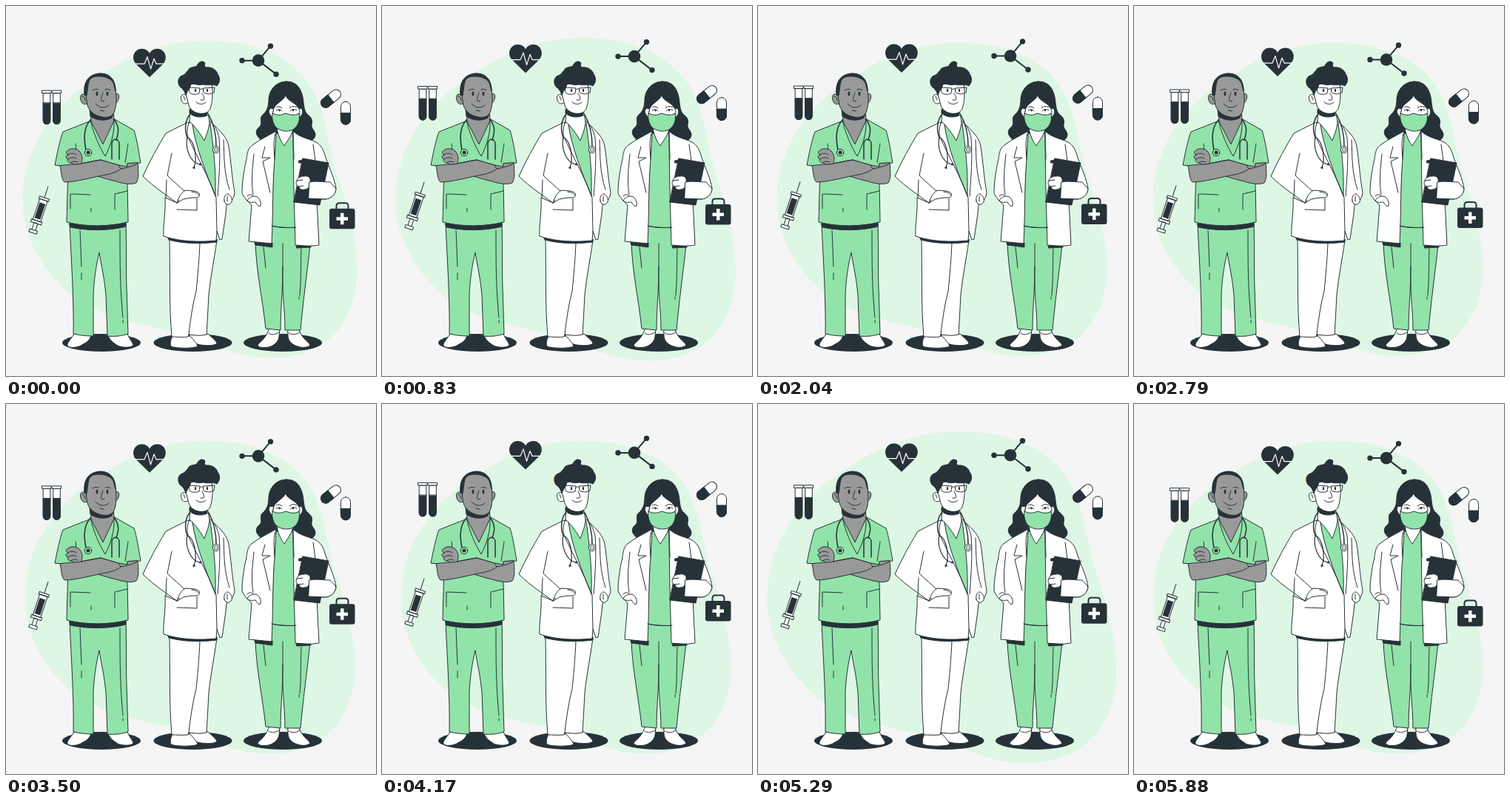
Recreate the animation shown at these times as an HTML page. Size 500 by 500 pixels, loop 5.93 s.

```html
<!DOCTYPE html>
<html lang="en">
<head>
<meta charset="utf-8">
<title>Medical team</title>
<style>
  html, body { margin: 0; width: 100%; height: 100%; overflow: hidden; background: #f5f5f5; }
  svg { display: block; width: 100%; height: 100%; }
  .l { fill: none; }
  .w { fill: #fff; }
  .g { fill: #92e3a9; }
  .s { fill: #999; }
  .d { fill: #263238; }
  .n { stroke: none; }
  .line { stroke: #263238; stroke-width: 1; stroke-linecap: round; stroke-linejoin: round; }
  .tube { fill: none; stroke-width: 1.5; }
</style>
</head>
<body>
<svg viewBox="0 0 500 500">
  <path id="blob" fill="#def7e5" d="M25.5 262C25.5 197 61 146 105 112C150 78 205 50 270 49.5C345 50 399 78 420 131C432 162 434 195 443 222C455 260 471 303 471 356C471 430 425 473 355 473C300 472 270 447 205 433C150 420 107 410 73 373C40 338 25.5 300 25.5 262Z"/>

  <g class="d">
    <ellipse cx="129" cy="455" rx="53" ry="12"/>
    <ellipse cx="252.500" cy="455" rx="53" ry="12"/>
    <ellipse cx="374" cy="455" rx="53" ry="12"/>
  </g>

  <!-- nurse in scrubs -->
  <g class="line">
    <path class="w" d="M92 443L115 444C114 451 109 455 104 457C98 462 85 463 83 459C82 455 89 449 92 443Z"/>
    <path class="w" d="M138 444L164 443C166 449 171 454 172 458C171 462 157 462 151 459C145 455 139 451 138 444Z"/>
    <path class="g" d="M86 294L162 294C163 330 162 350 163 380L165 443C156 446 147 447 137 446L135 390C133 368 129 352 126 333C122 350 119 368 118 390L118 446C108 446 100 445 91 443C92 400 88 340 86 294Z"/>
    <path class="l" d="M100 303L102 352M102 361L102 370M154 303C154 350 154 380 158 421M158 425L158 428"/>
    <path class="d" d="M86 294C110 297 140 297 162 293L162 298C140 304 110 304 87 299Z"/>
    <path class="g" d="M115 155L77 170C73 180 69 200 66 215L84 217L82 292C110 299 140 298 165 292L164 238L164 213L182 212C179 195 177 180 173 168L145 152Z"/>
    <path class="l" d="M94 186L95 196M165 186L161 212M87 274L87 254L114 255M115 273L115 278M147 275L147 254L164 250"/>
    <path class="s" d="M114 136L115 156L131 187L146 155L145 138Z"/>
    <path class="d" d="M113 140L114 149C123 155 135 156 143 151L146 142Z"/>
    <path class="l" d="M114 154C118 172 126 190 134 203C142 188 147 171 146 153"/>
    <path class="s" d="M108 120C102 117 99 121 101 127C102 132 106 134 110 132Z"/>
    <path class="s" d="M147 120C152 116 154 121 152 126C151 130 149 132 146 131Z"/>
    <path class="s" d="M108 121C106 105 114 94 127 93C140 92 147 100 148 112C150 125 149 137 146 144C142 152 133 151 126 149C117 146 112 141 110 134Z"/>
    <path class="d" d="M106 120C104 102 112 92 127 91C141 91 148 100 148 115L145 104C140 94 120 93 114 98C110 104 111 113 109 121Z"/>
    <path class="l" d="M117 114C120 112 123 112 125 113M134 113C136 112 139 112 141 114M131 117C130 122 127 127 129 128C130 129 132 129 133 128M121 132C126 138 134 139 139 134M127 141L132 142M103 122C105 122 107 125 107 128"/>
    <ellipse class="d n" cx="123" cy="118.500" rx="1.400" ry="3"/>
    <ellipse class="d n" cx="137" cy="118.500" rx="1.400" ry="3"/>
    <path class="tube" d="M114 154C105 164 105 180 108 194M146 153C154 164 152 172 149 181M143 207L143 187C143 178 153 178 153 187L153 207"/>
    <circle class="g" cx="111" cy="198" r="4.800"/>
    <circle class="d n" cx="111" cy="198" r="2.500"/>
    <path class="s" d="M178 212C179 222 180 233 176 239C169 242 158 240 149 237C136 234 127 231 118 228L101 213C110 212 119 209 128 208L152 215L164 217L164 213Z"/>
    <path class="s" d="M73 216C75 225 75 235 79 238C95 238 118 231 140 227C147 225 152 223 155 220L152 215L128 208L101 213Z"/>
    <path class="l" d="M155 220C162 219 170 217 178 213"/>
    <path class="s" d="M128 208C119 209 111 211 102 213C104 206 103 200 99 196C95 192 87 192 84 195C80 197 81 200 84 201C80 202 80 206 84 207C82 209 84 212 88 212C91 215 97 214 102 213"/>
    <path class="l" d="M84 201C88 198 92 199 95 201M84 207C88 204 91 204 95 206M88 212C91 209 94 210 97 211"/>
  </g>

  <!-- doctor with glasses -->
  <g class="line">
    <path class="w" d="M248 443L273 443C278 448 284 452 285 456C281 460 265 459 259 457C252 455 247 450 248 443Z"/>
    <path class="w" d="M225 446L249 446C253 451 258 456 259 460C253 463 230 463 223 460C221 456 223 450 225 446Z"/>
    <path class="w" d="M221 316L285 316C281 345 277 363 274 390C273 410 272 427 271 444C263 446 255 445 247 444L246 447C239 448 231 447 224 447C220 400 222 360 221 316Z"/>
    <path class="l" d="M262 320C261 345 259 365 257 385C252 405 249 425 247 444"/>
    <path class="d" d="M219 312C240 318 265 319 285 315L285 319C262 322 238 321 220 316Z"/>
    <path class="w" d="M244 158L216 172C205 190 194 210 185 230C200 245 216 255 231 266L215 259C216 280 212 296 213 311C235 319 264 319 284 317L285 304L289 316L292 315C294 299 297 285 298 269C303 267 308 261 309 252C305 230 304 208 301 190C299 178 292 171 276 156Z"/>
    <path class="g" d="M252 160L276 158C280 190 284 220 283 257C270 225 256 190 252 160Z"/>
    <path class="w" d="M249 138L248 156C256 163 264 175 268 182C271 173 275 164 275 156L272 140Z"/>
    <path class="d" d="M248 140L248 145C255 151 265 151 272 148L272 143Z"/>
    <path class="l" d="M248 156C245 163 244 170 246 177C257 202 273 229 284 259L285 304M275 155C281 160 285 166 288 178C290 205 288 230 286 257M224 199L218 229C226 237 235 244 241 250M294 181C295 204 294 224 302 248M216 259L217 235"/>
    <path class="w" d="M231 266C233 259 237 251 243 249C250 250 257 249 261 253C263 257 260 259 256 259C250 259 244 260 240 261Z"/>
    <path class="l" d="M251 251C256 251 259 253 261 256M231 275L258 276L258 260M231 266L234 262"/>
    <path class="w" d="M295 264C294 258 296 254 300 254C304 256 306 260 305 265C302 269 297 270 295 264ZM299 257L299 264"/>
    <path class="tube" d="M248 147C242 155 241 168 245 178M274 147C281 160 284 174 284 189"/>
    <path class="l" style="stroke-width:1.200" d="M245 178C242 190 247 205 256 212M245 178C253 180 257 196 256 212M256 212L254 218M256 212L262 214"/>
    <circle class="d n" cx="254" cy="218.500" r="1.600"/>
    <circle class="d n" cx="262.500" cy="214" r="1.600"/>
    <circle class="w" cx="284" cy="194" r="4.700"/>
    <circle class="l" cx="284" cy="194" r="2.500"/>
    <path class="w" d="M244 121C239 117 235 121 237 127C238 132 242 133 246 131Z"/>
    <path class="w" d="M243 108C247 98 275 97 278 106C280 118 279 130 276 139C273 145 267 146 260 145C251 143 247 137 246 130L243 119Z"/>
    <path class="d" d="M243 120C241 116 240 112 236 110C231 105 232 96 238 94C242 93 243 90 246 87C248 82 254 83 258 81C260 75 266 73 269 77C268 80 268 82 271 83C278 82 285 87 286 92C290 97 289 104 285 108C280 105 273 108 266 106C259 108 254 104 250 106C249 109 248 112 246 114Z"/>
    <path class="l" d="M245 112L248 111M248 110L262 111L261 118C258 120 250 120 248 117ZM267 111L282 110L281 117C277 120 269 119 267 117ZM262 113C264 111 266 112 267 113M265 118C267 122 269 125 267 127L263 127M257 130C262 134 267 133 270 130M240 122L242 127"/>
    <ellipse class="d n" cx="256" cy="114" rx="1.200" ry="2.300"/>
    <ellipse class="d n" cx="272" cy="114" rx="1.200" ry="2.300"/>
  </g>

  <!-- doctor with mask -->
  <g class="line">
    <path class="w" d="M356 434L370 434L369 447C368 454 362 459 355 461C348 462 341 462 340 458C344 453 353 448 356 434Z"/>
    <path class="w" d="M381 434L395 434C398 448 408 453 411 458C409 462 399 462 394 460C387 458 381 453 381 445Z"/>
    <path class="l" d="M355 442C360 446 365 443 369 441M382 442C387 445 392 444 397 441"/>
    <path class="g" d="M337 320L359 297L392 299L411 322C407 360 401 402 398 438L377 438C377 410 373 390 374 352C374 386 371 410 371 438L351 436C347 398 338 357 337 320Z"/>
    <path class="l" d="M374 321L374 352M348 326L351 354M399 328C398 350 399 372 397 391M396 393L396 396"/>
    <path class="d" d="M336 318L360 320L360 326L337 323ZM392 320L412 322L412 326L393 327Z"/>
    <path class="d" d="M379 102C365 102 356 113 355 126C355 137 352 143 346 148C342 153 347 158 343 163C337 167 337 173 341 177C344 182 349 184 356 183L401 184C409 185 418 181 418 174C418 168 412 166 413 160C415 154 412 150 408 147C402 142 403 134 401 123C398 109 391 102 379 102Z"/>
    <path class="g" d="M364 172L390 172L394 300C383 299 371 300 359 297Z"/>
    <path class="w" d="M366 160L367 170C369 178 373 185 376 189C380 183 385 176 387 170L388 160Z"/>
    <path class="w" d="M365 169C355 175 342 181 333 188C328 191 326 197 325 207C321 224 319 239 319 253C322 260 328 265 332 269L328 318L359 321C361 281 360 240 363 207Z"/>
    <path class="w" d="M388 169C394 176 407 179 417 183C426 187 429 194 432 205C437 219 444 233 446 247C445 255 440 260 432 261L420 261L423 323C413 325 402 324 391 323L389 250Z"/>
    <path class="l" d="M365 169C361 179 362 193 363 207M388 169C388 185 389 195 389 207M350 190L346 205L357 205L347 210L357 252M335 200C333 219 331 237 334 255M415 187L418 209M359 297C370 300 384 300 392 299"/>
    <path class="w" d="M326 263C328 258 333 257 338 257C343 260 345 265 344 270C341 272 339 268 337 265C334 265 330 267 326 263Z"/>
    <path class="l" d="M334 257C332 254 329 254 326 257"/>
    <path class="d" d="M401 206L436 212L424 269L389 265Z"/>
    <path class="d" d="M396 209L403 208L404 212L396 212Z"/>
    <path class="w" d="M393 236C394 232 398 230 403 230C408 229 412 232 411 237C411 243 409 248 403 248C399 249 396 247 396 244C392 243 391 239 393 236Z"/>
    <path class="w" d="M410 238C419 236 429 238 438 238L446 247C445 255 440 260 432 261L409 260Z"/>
    <path class="l" d="M394 236L401 235M396 244L402 243"/>
    <path class="w" d="M361 139C355 136 354 143 357 147C359 151 361 151 363 150ZM396 139C401 136 402 144 399 148C397 151 395 151 394 150Z"/>
    <path class="w" d="M361 142C362 132 373 130 378 121C381 130 394 130 397 142C397 152 393 163 386 167C378 170 370 168 365 162C361 155 360 148 361 142Z"/>
    <path class="g" d="M360 145C368 149 373 147 378 145C384 147 390 149 396 145C398 155 394 163 388 167C380 171 370 169 364 163C360 157 359 150 360 145Z"/>
    <path class="l" d="M365 137C367 135 371 136 373 138M383 138C386 135 390 135 393 137M365 141C368 139 371 140 373 142M384 142C386 139 390 139 393 141"/>
    <circle class="d n" cx="369.500" cy="141" r="1.300"/>
    <circle class="d n" cx="388" cy="141" r="1.300"/>
  </g>

  <g id="icons" class="line">
    <path class="d n" d="M194 96L175.500 78C168 69 174 57.500 183.500 57.500C189 57.500 192.500 60.500 194 64C195.500 60.500 199 57.500 204.500 57.500C214 57.500 220 69 212.500 78Z"/>
    <path class="l" style="stroke:#fff;stroke-width:1.200" d="M173 78H187L191 68.500L195.500 85L200 71L203 78H215"/>

    <g id="tubes"></g>

    <g transform="translate(46.500 275) rotate(18.400)">
      <path class="l" d="M0 -33V-17"/>
      <path class="w" d="M-5.500 -14H5.500V16H-5.500ZM-7 -17H7V-13.500H-7ZM-2.500 19H2.500V29H-2.500ZM-7.500 15.500H7.500V19.500H-7.500ZM-5.500 29H5.500V33H-5.500Z"/>
      <path class="d n" d="M-4 -9H4V13H-4Z"/>
    </g>

    <path class="l" style="stroke-width:2" d="M357.500 54L341 73.500L319 73.500M341 73.500L365 92"/>
    <g class="d n">
      <circle cx="341" cy="73.500" r="8.300"/>
      <circle cx="357.500" cy="54" r="3.700"/>
      <circle cx="319" cy="73.500" r="3.700"/>
      <circle cx="365" cy="92" r="3.700"/>
    </g>

    <g id="pills"></g>

    <path class="l" style="stroke-width:2" d="M446.500 275V270Q446.500 266 450.500 266H458.500Q462.500 266 462.500 270V275"/>
    <rect class="d n" x="437" y="273.500" width="34.500" height="27.500" rx="3"/>
    <path class="n w" d="M452 279.500H456.500V285H462V289.500H456.500V295H452V289.500H446.500V285H452Z"/>
  </g>
</svg>
<script>
const byId = id => document.getElementById(id);
const LOOP = 5930, FPS = 24, LAST = 141, LEAD = 20;

byId('tubes').innerHTML = [55, 68.5].map(x => `
  <g transform="translate(${x} 114)">
    <path class="w" d="M-4.800 4V40Q-4.800 45.500 0 45.500Q4.800 45.500 4.800 40V4Z"/>
    <path class="d" d="M-4.800 17V40Q-4.800 45.500 0 45.500Q4.800 45.500 4.800 40V17Z"/>
    <rect class="w" x="-6.200" width="12.400" height="3.500"/>
  </g>`).join('');

byId('pills').innerHTML = [[439, 125, 51], [459, 144.5, 0]].map(([x, y, turn]) => `
  <g transform="translate(${x} ${y}) rotate(${turn})">
    <rect class="w" x="-6.500" y="-15.500" width="13" height="31" rx="6.500"/>
    <path class="d" d="M-6.500 0H6.500V9A6.500 6.500 0 0 1 -6.500 9Z"/>
  </g>`).join('');

// Double heartbeat: two linear swells, then a rest.
const BEAT = [[0, 1], [.1, 1.1], [.3, 1], [.4, 1], [.5, 1.1], [.6, 1], [1, 1]];

function track(keys, p) {
  const i = keys.findIndex(([at]) => at > p);
  const [a, from] = keys[i - 1], [b, to] = keys[i];
  return from + (to - from) * (p - a) / (b - a);
}

function draw(ms) {
  const frame = Math.min(LAST, Math.floor((ms % LOOP + 5) * FPS / 1000));
  const t = frame * 1000 / FPS + LEAD;
  const scale = track(BEAT, t % 1500 / 1500);
  const drop = 10 * Math.abs(t % 3000 / 1500 - 1) - 9.7;
  byId('blob').setAttribute('transform', `translate(248.3 261.2) scale(${scale}) translate(-248.3 -261.2)`);
  byId('icons').setAttribute('transform', `translate(0 ${drop})`);
}

const start = performance.now();
function tick() {
  draw(performance.now() - start);
  requestAnimationFrame(tick);
}
tick();
</script>
</body>
</html>
```
